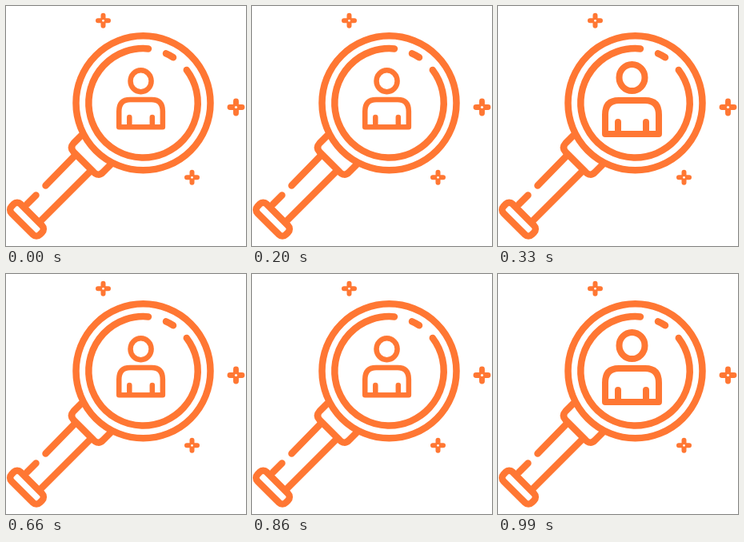
Animation, 300 px wide and 300 px high, one loop 1.32 s. Source, as an HTML page without scripts:

```html
<!DOCTYPE html>
<html lang="en">
<head>
<meta charset="utf-8">
<title>People search</title>
<style>
  html, body { margin: 0; width: 100%; height: 100%; overflow: hidden; background: #fff; }
  svg { display: block; width: 100vw; height: 100vh; }
  .ink { fill: none; stroke: #ff7733; stroke-width: 8.5; stroke-linecap: round; stroke-linejoin: round; }
  .person { stroke-width: 8; animation: pulse 660ms step-end infinite; }
  @keyframes pulse {
    0% { transform: translate(32px, 20.8px) scale(.815); }
    50%, 100% { transform: none; }
  }
</style>
</head>
<body>
<svg viewBox="0 0 300 300">
  <defs>
    <g id="spark">
      <path d="M-6.5 0H6.5M0 -6.5V6.5" stroke-width="6"/>
      <circle r="1.4" fill="#fff" stroke="none"/>
    </g>
  </defs>
  <g class="ink">
    <!-- lens -->
    <circle cx="171.5" cy="121.3" r="84"/>
    <path d="M225.8 80A68.2 68.2 0 1 1 178 53.4M200 59.3Q205 61.4 209 64.3"/>

    <!-- handle -->
    <path d="M94 162L84.5 171.5Q79.5 177 84.5 182.5L109.5 207.5Q115 213.5 121 208L131 198"/>
    <path d="M86 187L49.5 224.5M37.5 236.5L26 248M105 207L44 268"/>
    <rect x="-25" y="-8" width="50" height="16" rx="6" transform="translate(26 266.7) rotate(45)"/>

    <use href="#spark" x="121.5" y="18.3"/>
    <use href="#spark" x="232.5" y="214.3"/>
    <use href="#spark" transform="translate(287.5 126.5) scale(1.15)"/>

    <g class="person">
      <ellipse cx="167.5" cy="89.5" rx="16" ry="16.5"/>
      <path d="M134 160V136Q134 118 151 118H184Q201 118 201 136V160ZM150 145V157M185 145V157"/>
    </g>
  </g>
</svg>
</body>
</html>
```
